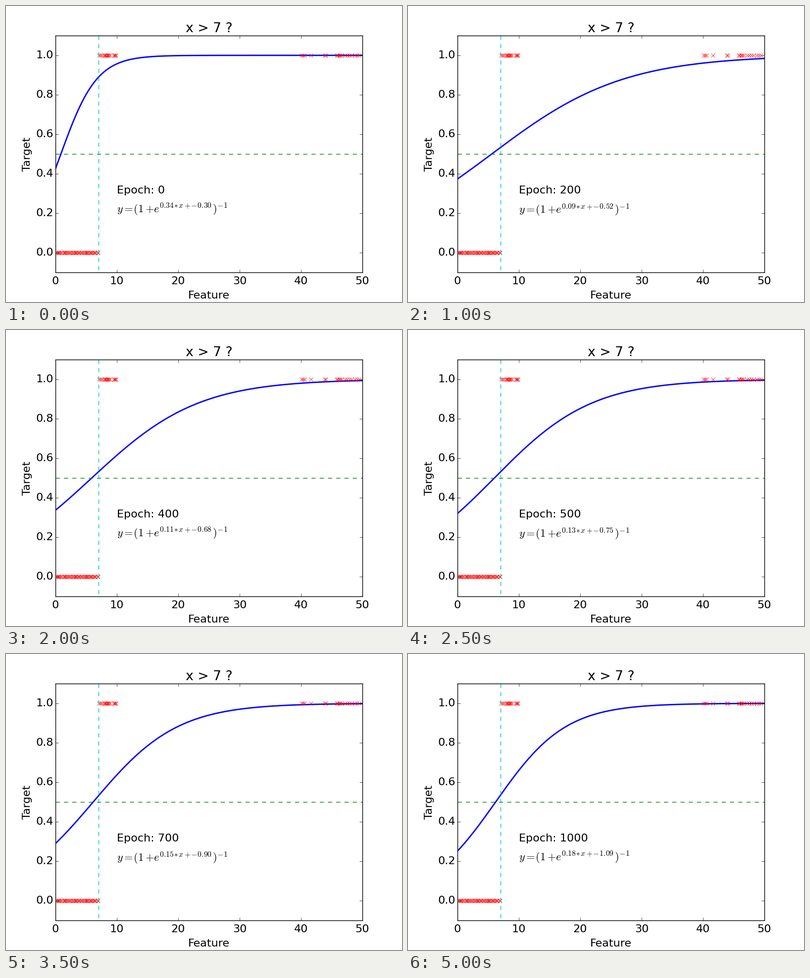
Animation, 800 px wide and 600 px high, one loop 5.5 s. Source, as a matplotlib script:

```python
import numpy as np
import matplotlib.pyplot as plt
from matplotlib.animation import FuncAnimation

plt.style.use("classic")
plt.rcParams.update({
    "font.family": "DejaVu Sans",
    "font.size": 16,
    "figure.dpi": 100,
    "savefig.dpi": "figure",
    "figure.facecolor": "white",
    "savefig.facecolor": "white",
    "xtick.major.pad": 5.7,
    "ytick.major.pad": 3,
})

FRAMES, INTERVAL = 11, 500
SPLIT = 7
rng = np.random.default_rng(7)


def scatter(lo, hi, n):
    """Random points, one in each of n equal cells."""
    return lo + (hi - lo) * (np.arange(n) + rng.random(n)) / n


def clusters(*groups):
    return np.concatenate([np.linspace(*g) for g in groups])


def params(i):
    """Weight and bias: a rough first guess, then slow, easing training."""
    if i == 0:
        return 0.34, -0.298
    return (0.0701 + 0.01155 * i - 0.0001 * i**2,
            -0.3457 - 0.08845 * i + 0.0014 * i**2)


def sigmoid(z):
    return 1 / (1 + np.exp(-z))


def formula(w, b):
    thin, gap = r"\hspace{0.1}", r"\hspace{0.2}"
    power = (rf"{w:.2f}{thin}{{*}}{thin}x{gap}{{+}}"
             rf"{thin}{{-}}{thin}{abs(b):.2f}")
    return (rf"$y=\hspace{{-0.12}}(1{gap}{{+}}"
            rf"e^{{{power}}}\hspace{{0.07}})^{{-1}}$")


fig, ax = plt.subplots(figsize=(8, 6))
fig.subplots_adjust(left=0.125, right=0.9, bottom=0.1, top=0.9)
ax.set(xlim=(0, 50), ylim=(-0.1, 1.1), yticks=np.arange(0, 1.1, 0.2),
       title="x > 7 ?")
ax.set_xlabel("Feature", labelpad=6.8)
ax.set_ylabel("Target")

low = scatter(0, SPLIT, 43)
high = clusters((7.1, 7.55, 3), (7.9, 8.85, 8), (9.5, 9.85, 4),
                (40.1, 40.6, 3), (41.6, 41.6, 1), (43.9, 44, 2),
                (45.8, 46.6, 5), (47.2, 48.2, 4), (48.8, 49.45, 3))
points = np.concatenate([low, high])

xs = np.linspace(0, 50, 501)
curve, = ax.plot(xs, xs * 0, "b", lw=2)
ax.plot([0, 50], [0.5, 0.5], "g--", lw=1)
ax.plot(points, points > SPLIT, "rx")
ax.plot([SPLIT, SPLIT], [1.1, -0.1], "c--", lw=1)
epoch = ax.text(10, 0.3, "")
equation = ax.text(10, 0.2, "")


def update(i):
    w, b = params(i)
    curve.set_ydata(sigmoid(w * xs + b))
    epoch.set_text(f"Epoch: {100 * i}")
    equation.set_text(formula(w, b))
    return curve, epoch, equation


anim = FuncAnimation(fig, update, frames=FRAMES, interval=INTERVAL,
                     init_func=lambda: update(0), repeat=True,
                     repeat_delay=0, blit=False)
plt.show()
```
